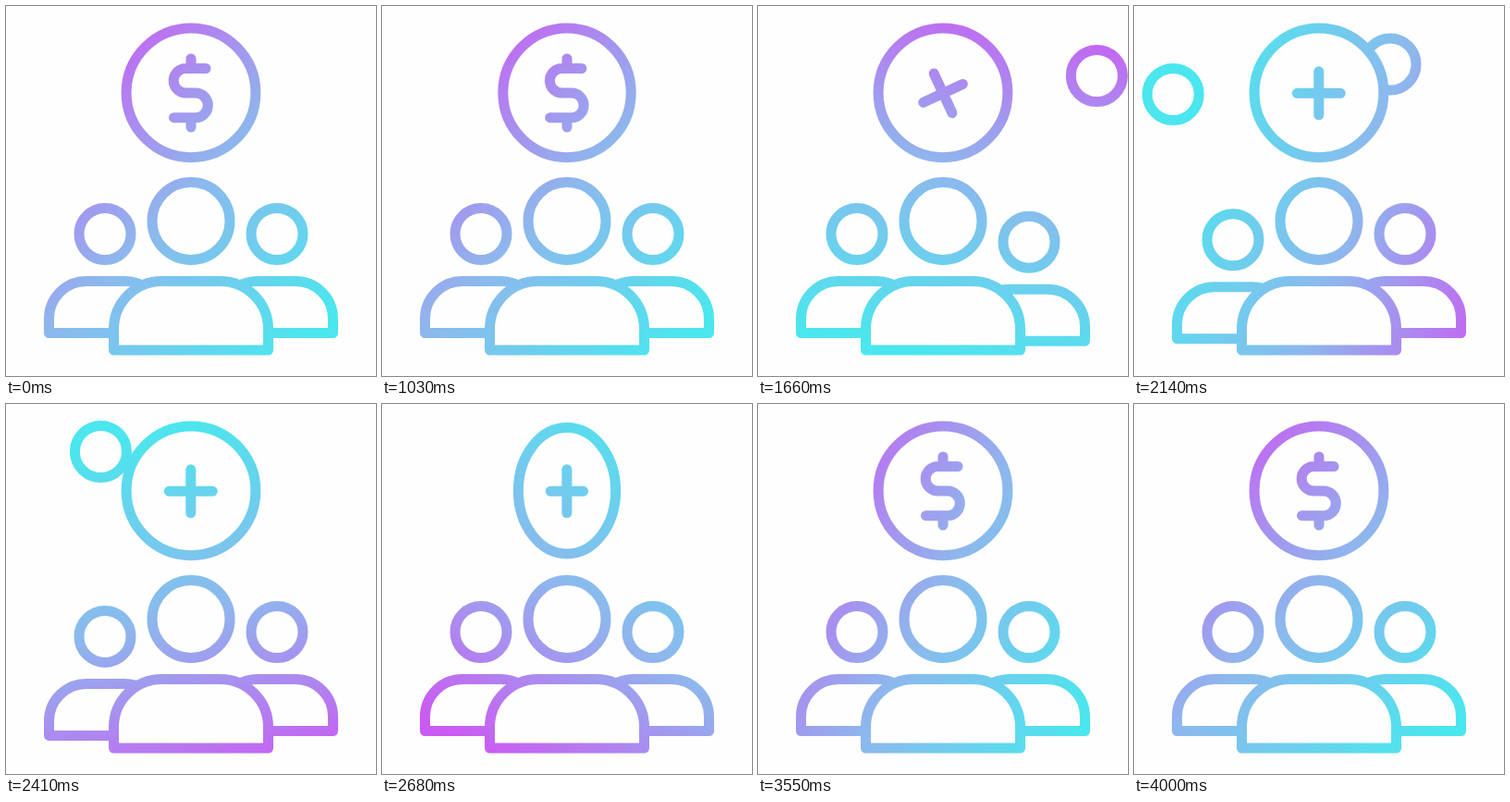
Recreate the animation shown at these times as an HTML page with a canvas. Size 400 by 400 pixels, loop 4030 ms.

```html
<!DOCTYPE html>
<html lang="en">
<head>
<meta charset="utf-8">
<title>Group funding icon</title>
<style>
  html, body { margin: 0; width: 100%; height: 100%; overflow: hidden; background: #fefefe; }
  canvas { display: block; width: 400px; height: 400px; }
</style>
</head>
<body>
<canvas id="stage" width="400" height="400"></canvas>
<script>
const ctx = document.getElementById('stage').getContext('2d');
const LOOP = 4030, HOLD = 1030, STEP = 30;
const BG = '#fefefe';
const COIN = { x: 200, y: 93.8, r: 69.9 };

// Each row: step, then values.
const turn = [[-1, 0, 0], [21, 58, 22], [37, 155, 42], [55, 260, 0], [71, 315, 0], [99, 360, 0]];
const rightToss = [[3, 293, 246.5], [10, 321, 194], [17, 360, 112], [21, 366.3, 75.5],
  [26, 354, 45], [31, 322, 38.5], [37, 277, 63], [43, 206, 92]];
const leftToss = [[21, 107, 246.5], [28, 72, 190], [34, 45, 123], [37, 42.3, 95.5],
  [40, 48, 65], [44, 79, 47], [48, 130, 62], [52, 194, 92]];

const body = new Path2D('M116.5 372V349.5A52 52 0 0 1 168.5 297.5H231.5A52 52 0 0 1 283.5 349.5V372Z');
const side = new Path2D('M150 353.5H46.5V338A40.5 40.5 0 0 1 87 297.5H128Q140 297.5 150 303.5');
const dollar = new Path2D('M216 67.5H194.5a13.3 13.3 0 0 0 0 26.6H205a13.3 13.3 0 0 1 0 26.6H181.5' +
  'M200 57V67.5M200 120.7V131');
const plus = new Path2D('M176.3 94.3H223.3M199.8 70.8V117.8');

const clamp = v => Math.max(0, Math.min(1, v));
const ease = v => (1 - Math.cos(Math.PI * clamp(v))) / 2;
const dip = (s, start, length) => 8.8 * Math.sin(Math.PI * clamp((s - start) / length));

// Smooth curve through the rows of a table.
function sample(rows, s) {
  const last = rows.length - 1;
  if (s <= rows[0][0]) return rows[0].slice(1);
  if (s >= rows[last][0]) return rows[last].slice(1);
  const i = rows.findIndex(r => r[0] > s) - 1;
  const a = rows[i], b = rows[i + 1], span = b[0] - a[0], u = (s - a[0]) / span;
  const slope = (k, c) => k === 0 || k === last ? 0 :
    (rows[k + 1][c] - rows[k - 1][c]) / (rows[k + 1][0] - rows[k - 1][0]);
  return a.slice(1).map((v, j) => {
    const c = j + 1, u2 = u * u, u3 = u2 * u;
    return (2 * u3 - 3 * u2 + 1) * v + (u3 - 2 * u2 + u) * span * slope(i, c) +
      (3 * u2 - 2 * u3) * b[c] + (u3 - u2) * span * slope(i + 1, c);
  });
}

function makeGradient(s) {
  const [deg, shift] = sample(turn, s);
  const a = (225 + deg) * Math.PI / 180, dx = Math.cos(a), dy = Math.sin(a);
  const at = d => [200 + dx * (shift + d), 200 + dy * (shift + d)];
  const g = ctx.createLinearGradient(...at(200), ...at(-200));
  g.addColorStop(0, '#cb5af2');
  g.addColorStop(0.5, '#8db8ed');
  g.addColorStop(1, '#4be6ee');
  return g;
}

function place(path, matrix) {
  const p = new Path2D();
  p.addPath(path, matrix);
  return p;
}

function draw(path, filled = true) {
  if (filled) ctx.fill(path);
  ctx.stroke(path);
}

function ring(x, y, rx, ry = rx) {
  const p = new Path2D();
  p.ellipse(x, y, rx, ry, 0, 0, 2 * Math.PI);
  draw(p);
}

function drawToss(rows, s) {
  if (s > rows[0][0] && s < rows[rows.length - 1][0]) ring(...sample(rows, s), 28);
}

function drawSide(x, drop, mirrored) {
  ring(x, 246.5 + drop, 28);
  const m = mirrored ? [-1, 0, 0, 1, 400, drop] : [1, 0, 0, 1, 0, drop];
  draw(place(side, new DOMMatrix(m)));
}

function drawCoin(s) {
  const first = clamp((s + 1) / 22), second = clamp((s - 49.7) / 23.2);
  const scale = Math.max(0.01, Math.abs(Math.cos(Math.PI * (first + second))));
  const tall = 1 - 0.1 * (1 - scale);
  ring(COIN.x, COIN.y, COIN.r * scale, COIN.r * tall);
  const isPlus = first >= 0.5 && second < 0.5;
  const m = new DOMMatrix().translate(COIN.x, COIN.y).scale(scale, 1);
  if (isPlus) m.rotateSelf(-90 * (1 - ease((s - 10) / 17)));
  m.translateSelf(-COIN.x, -COIN.y);
  draw(place(isPlus ? plus : dollar, m), false);
}

function render(t) {
  const s = t < HOLD ? -1 : Math.floor((t - HOLD) / STEP);
  ctx.fillStyle = BG;
  ctx.fillRect(0, 0, 400, 400);
  ctx.strokeStyle = makeGradient(s);
  ctx.lineWidth = 11;
  ctx.lineCap = ctx.lineJoin = 'round';
  drawToss(rightToss, s);
  drawToss(leftToss, s);
  drawSide(107, dip(s, 33, 16), false);
  drawSide(293, dip(s, 12, 20), true);
  draw(body);
  ring(200, 232.5, 42);
  drawCoin(s);
}

const start = performance.now();
function tick() {
  render((performance.now() - start) % LOOP);
  requestAnimationFrame(tick);
}
tick();
</script>
</body>
</html>
```
